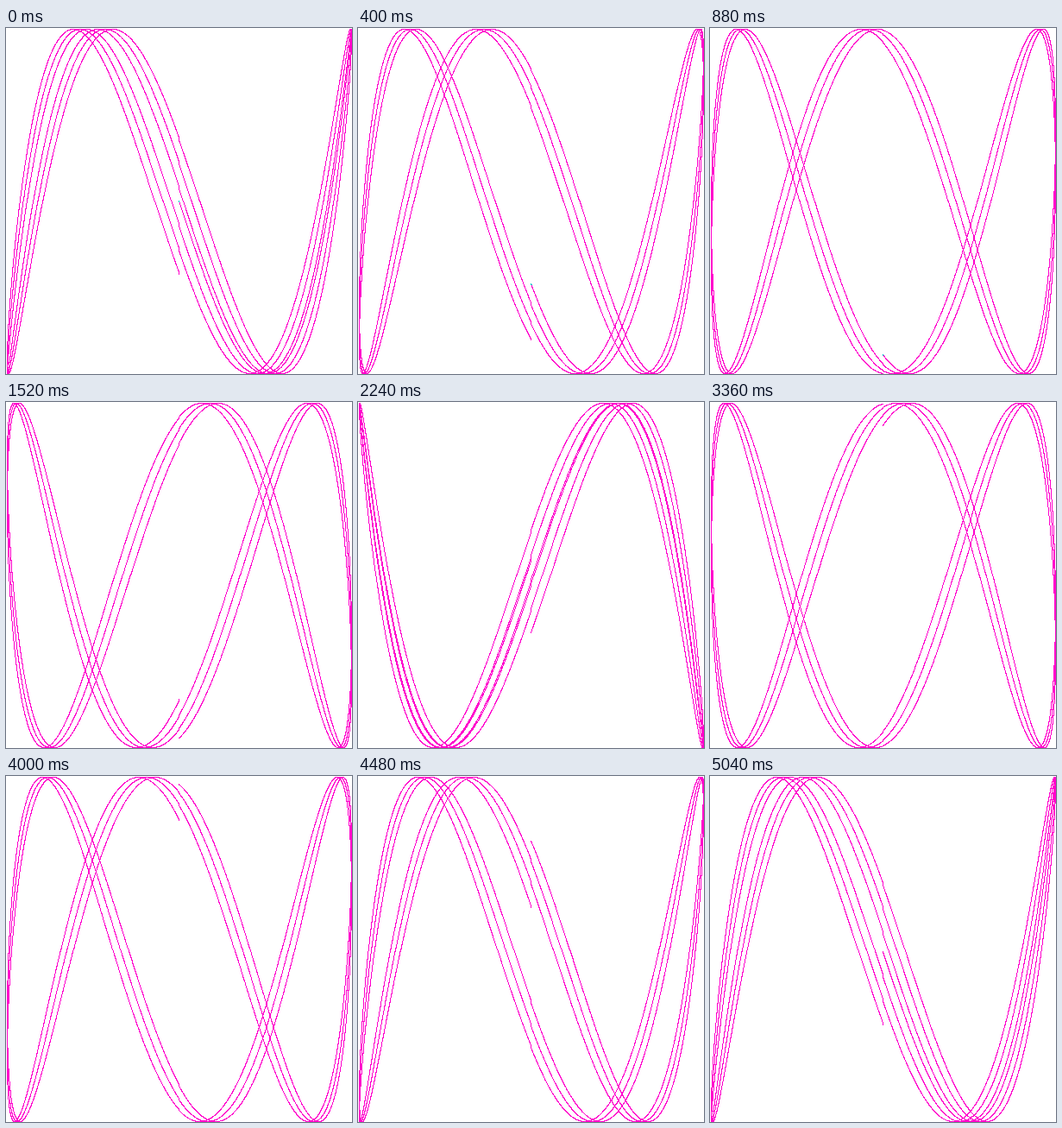
These frames come from a looping animation (401 px wide and 401 px high, 5120 ms). An HTML page with a canvas:

```html
<!DOCTYPE html>
<html>
<head>
<meta charset="utf-8">
<title>Lissajous</title>
<style>
html, body { margin: 0; width: 100%; height: 100%; overflow: hidden; background: #fff; }
canvas { display: block; image-rendering: pixelated; }
</style>
</head>
<body>
<canvas id="stage" width="401" height="401"></canvas>
<script>
const SIZE = 200, WIDTH = 2 * SIZE + 1;
const CYCLES = 3, RES = 0.001, FREQ = 0.6046602879796196 * 5;
const STEPS = 64, DELAY = 80, PHASE_STEP = 0.1;
const TIP_LENGTH = 0.004, TIP_STEPS = 16;

// Pixel colours in ABGR order
const WHITE = 0xffffffff, PINK = 0xffcc00ff, TEAL = 0xffc8c800;

const ctx = document.getElementById('stage').getContext('2d');
const image = ctx.createImageData(WIDTH, WIDTH);
const pixels = new Uint32Array(image.data.buffer);

// Truncation toward zero makes the centre row and column twice as wide
const toPixel = v => SIZE + Math.trunc(v * SIZE + 0.5);

function draw(step) {
  const phase = step * PHASE_STEP;
  const tip = step < TIP_STEPS ? TIP_LENGTH : 0;
  pixels.fill(WHITE);
  for (let t = 0; t < CYCLES * 2 * Math.PI; t += RES) {
    const x = toPixel(Math.sin(t));
    const y = toPixel(Math.sin(t * FREQ + phase));
    pixels[y * WIDTH + x] = t < tip ? TEAL : PINK;
  }
  ctx.putImageData(image, 0, 0);
}

const start = performance.now();
let shown = -1;

function tick() {
  const step = Math.floor((performance.now() - start) / DELAY) % STEPS;
  if (step !== shown) draw(shown = step);
  requestAnimationFrame(tick);
}
tick();
</script>
</body>
</html>
```
